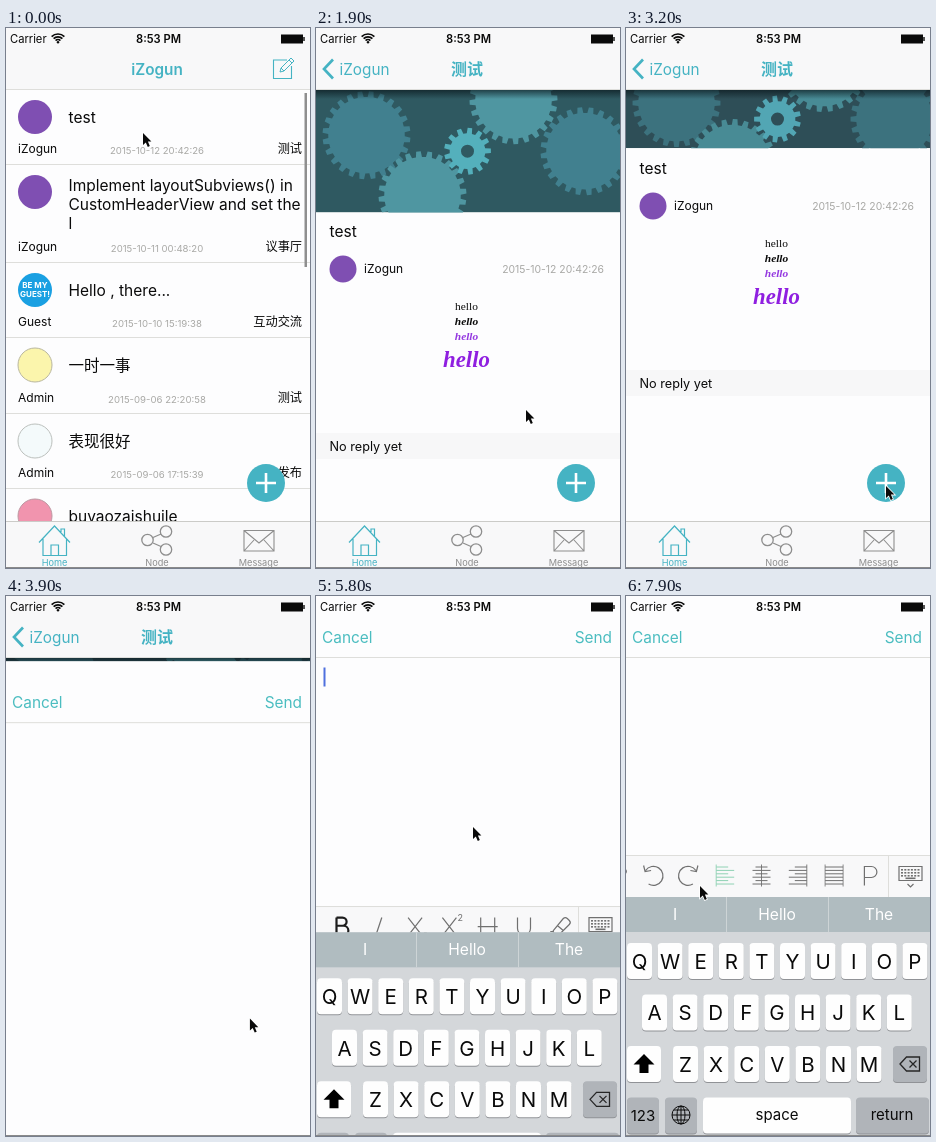
An HTML page with a canvas for the animation above (8 s loop, 304x540 px).

```html
<!DOCTYPE html>
<html lang="en">
<head>
<meta charset="utf-8">
<title>Forum app</title>
<style>
html, body { margin: 0; width: 100%; height: 100%; overflow: hidden; background: #fdfdfe; }
canvas { display: block; width: 304px; height: 540px; }
</style>
</head>
<body>
<canvas id="stage"></canvas>
<script>
const W = 304, H = 540, LOOP = 8000, STEP = 100, NAV = 62;
const canvas = document.getElementById('stage');
const ctx = canvas.getContext('2d');
const scale = window.devicePixelRatio || 1;
canvas.width = W * scale;
canvas.height = H * scale;

const SANS = 'Inter, "Noto Sans CJK SC", "Noto Sans CJK", sans-serif';
const SERIF = '"Liberation Serif", serif';
const PAPER = '#fdfdfe', BAR = '#f8f8f9', LINE = '#dededb', INK = '#0a0a0a';
const TEAL = '#45b3c3', GREEN = '#4bbdc0', DATE = '#a9a9a6', GREY = '#8e8e8e', ICON = '#707070';
const PURPLE = '#7f4fb2', OWNER = 'iZogun';

// ---- timing ----
const spring = ms => ms <= 0 ? 0 : 1 - (1 + .01826 * ms) * Math.exp(-.01826 * ms);
const mix = (a, b, p) => a + (b - a) * p;
const clamp = p => Math.max(0, Math.min(1, p));

// keys: [time, value, value...], eased between neighbours
function track(keys, t) {
  let i = 0;
  while (i < keys.length - 1 && keys[i + 1][0] <= t) i++;
  const a = keys[i], b = keys[i + 1] || a;
  const p = b === a ? 0 : clamp((t - a[0]) / (b[0] - a[0]));
  return a.slice(1).map((v, k) => mix(v, b[k + 1], p * p * (3 - 2 * p)));
}

const POINTER = [
  [0, 137, 105], [400, 137, 105], [1000, 190, 351], [1100, 191, 357], [1300, 197, 206],
  [1900, 210, 382], [2200, 211, 387], [2900, 258, 453], [3200, 260, 458], [3700, 260, 458],
  [4500, 157, 231], [6000, 157, 231], [6500, 232, 284], [7300, 74, 290]
];
const PULL = [[1300, 0], [1900, 120], [2200, 120], [2600, 57]];
const TOOL_SCROLL = [[6500, 0], [7400, 254]];

// ---- drawing helpers ----
function text(str, x, y, size, color, { align = 'left', weight = 400, family = SANS, style = '' } = {}) {
  ctx.font = `${style} ${weight} ${size}px ${family}`;
  ctx.textAlign = align;
  ctx.fillStyle = color;
  ctx.fillText(str, x, y + size * .36);
}
function rect(x, y, w, h, color) {
  ctx.fillStyle = color;
  ctx.fillRect(x, y, w, h);
}
function disc(x, y, r, color, edge) {
  ctx.beginPath();
  ctx.arc(x, y, r, 0, 7);
  ctx.fillStyle = color;
  ctx.fill();
  if (edge) { ctx.strokeStyle = edge; ctx.lineWidth = 1; ctx.stroke(); }
}
function stroke(d, color, width = 1.2) {
  ctx.strokeStyle = color;
  ctx.lineWidth = width;
  ctx.stroke(new Path2D(d));
}
function fill(d, color) {
  ctx.fillStyle = color;
  ctx.fill(new Path2D(d));
}
function group(x, y, draw, alpha = 1) {
  ctx.save();
  ctx.translate(x, y);
  ctx.globalAlpha *= alpha;
  draw();
  ctx.restore();
}
function clip(x, y, w, h) {
  ctx.beginPath();
  ctx.rect(x, y, w, h);
  ctx.clip();
}

// ---- topic list ----
const ROWS = [
  { h: 75, title: ['test'], who: OWNER, date: '2015-10-12 20:42:26', node: '测试', color: PURPLE },
  { h: 98, title: ['Implement layoutSubviews() in', 'CustomHeaderView and set the', 'l'], who: OWNER,
    date: '2015-10-11 00:48:20', node: '议事厅', color: PURPLE },
  { h: 75, title: ['Hello , there...'], who: 'Guest', date: '2015-10-10 15:19:38', node: '互动交流', color: '#1aa0e2' },
  { h: 76, title: ['一时一事'], who: 'Admin', date: '2015-09-06 22:20:58', node: '测试', color: '#fbf5ac', edge: '#b9b7a0' },
  { h: 75, title: ['表现很好'], who: 'Admin', date: '2015-09-06 17:15:39', node: '发布', color: '#f4fafb', edge: '#bcc0bd' },
  { h: 75, title: ['buyaozaishuile'], who: 'Admin', date: '2015-09-06 16:02:11', node: '测试', color: '#f194ae', edge: '#bd98a2' }
];

function drawList(t) {
  rect(0, 0, W, H, PAPER);
  let top = NAV;
  for (const r of ROWS) {
    const bottom = top + r.h;
    disc(29, top + 27, 17, r.color, r.edge);
    if (r.who === 'Guest') {
      text('BE MY', 29, top + 22, 8, '#fff', { align: 'center', weight: 700 });
      text('GUEST!', 29, top + 31, 8, '#fff', { align: 'center', weight: 700 });
    }
    const first = r.title.length > 1 ? 20 : 27;
    r.title.forEach((s, i) => text(s, 62.5, top + first + i * 19, 15.5, INK));
    text(r.who, 12, bottom - 16, 12, INK);
    text(r.date, 151, bottom - 14, 9.6, DATE, { align: 'center' });
    text(r.node, 296, bottom - 16, 12.2, INK, { align: 'right' });
    rect(0, bottom - 1, W, 1, LINE);
    top = bottom;
  }
  ctx.globalAlpha = 1 - clamp((t - 300) / 300);
  rect(298.5, 65, 2.5, 174, '#8f8f8f');
  ctx.globalAlpha = 1;
}

// ---- topic page with gears behind it ----
function gear(x, y, r, teeth, angle, color, hole = 0) {
  const step = Math.PI * 2 / teeth, inner = r * (hole ? .76 : .87);
  ctx.beginPath();
  for (let i = 0; i < teeth; i++) {
    for (const [f, rad] of [[-.3, inner], [-.2, r], [.2, r], [.3, inner]]) {
      const a = angle + (i + f) * step;
      ctx.lineTo(x + Math.cos(a) * rad, y + Math.sin(a) * rad);
    }
  }
  ctx.closePath();
  if (hole) { ctx.moveTo(x + hole, y); ctx.arc(x, y, hole, 0, Math.PI * 2, true); }
  ctx.fillStyle = color;
  ctx.fill('evenodd');
}
const blend = (a, b, p) => `rgb(${a.map((v, i) => Math.round(mix(v, b[i], p)))})`;

function drawGears(t, pull) {
  const height = pull * 1.02, p = clamp((t - 2300) / 500);
  const turn = pull * .02 + Math.max(0, t - 2200) * .002;
  const outer = blend([65, 128, 143], [60, 114, 126], p);
  const middle = blend([79, 150, 161], [72, 139, 149], p);
  ctx.save();
  clip(0, NAV, W, height);
  rect(0, NAV, W, height, blend([47, 89, 97], [46, 78, 87], p));
  ctx.translate(151.5, NAV + height / 2);
  gear(-101, -16, 44, 24, -turn / 2, outer);
  gear(46, -51, 44, 24, -turn / 2 + .1, middle);
  gear(117, 0, 44, 24, turn / 2, outer);
  gear(-45, 44, 44, 24, -turn / 2 + .06, middle);
  gear(0, 0, 23.5, 13, turn, blend([84, 176, 188], [82, 166, 180], p), 6.5);
  ctx.restore();
  const shade = ctx.createLinearGradient(0, NAV, 0, NAV + 9);
  shade.addColorStop(0, 'rgba(8,20,25,.65)');
  shade.addColorStop(1, 'rgba(8,20,25,0)');
  rect(0, NAV, W, Math.min(9, height), shade);
}

function drawTopic(t) {
  const [pull] = track(PULL, t);
  rect(0, 0, W, H, PAPER);
  if (pull > 0) drawGears(t, pull);
  group(0, pull, () => {
    text('test', 13.5, 83, 15.5, INK);
    disc(27, 121, 13.5, PURPLE);
    text(OWNER, 48, 121, 12, INK);
    text('2015-10-12 20:42:26', 288, 121.5, 10.4, DATE, { align: 'right' });
    const hello = (y, size, color, weight, style) =>
      text('hello', 150.5, y, size, color, { align: 'center', weight, style, family: SERIF });
    hello(158, 11.4, INK, 400, '');
    hello(173, 11.4, INK, 700, 'italic');
    hello(187.5, 11.4, '#9438e0', 700, 'italic');
    hello(210.5, 22.8, '#8f1fe0', 700, 'italic');
    rect(0, 285, W, 26, '#f7f7f8');
    text('No reply yet', 13.5, 298, 12.7, INK);
  });
}

// ---- bars ----
function drawStatus() {
  text('Carrier', 4, 11, 11.2, INK);
  for (const r of [3.4, 6.2, 9]) {
    ctx.beginPath();
    ctx.arc(52, 15, r, -Math.PI * .75, -Math.PI * .25);
    ctx.strokeStyle = INK;
    ctx.lineWidth = 1.7;
    ctx.stroke();
  }
  disc(52, 14.2, 1.2, INK);
  text('8:53 PM', 152.5, 11, 11.2, INK, { align: 'center', weight: 600 });
  rect(275, 6.5, 22, 9, INK);
  rect(297.3, 9, 1.4, 4, INK);
}

function drawNav(p) {
  rect(0, 0, W, NAV, BAR);
  rect(0, NAV - 1, W, 1, LINE);
  text(OWNER, mix(151, 48.5, p), 41, 15.3, TEAL, { align: 'center', weight: p < .5 ? 600 : 400 });
  group(mix(80, 0, p), 0, () => {
    text('测试', 151, 41, 16, TEAL, { align: 'center', weight: 600 });
  }, p);
  group(0, 0, () => stroke('M17 31.5L8 41l9 9.5', TEAL, 2.7), p);
  group(0, 0, () => {
    stroke('M281 32H267.500V50.500H285.500V38', TEAL, 1.1);
    stroke('M274 44l1-4 10-10 3 3-10 10zM275 40l3 3M283 32l3 3', TEAL, 1);
  }, 1 - p);
}

function drawTabs() {
  rect(0, 493, W, 47, BAR);
  rect(0, 493, W, 1, '#cbcbc8');
  stroke('M33 514.500L48.500 498 64 514.500M37 511V527.500H60.500V511M45 527.500V517H52.500V527.500M55 504V501H58.500V508', TEAL, 1.2);
  stroke('M147 509.500L155 506M147 515L155 518.500', GREY, 1.3);
  for (const [x, y] of [[141.500, 512], [160, 503.500], [160, 521.500]]) {
    ctx.beginPath();
    ctx.arc(x, y, 5.7, 0, 7);
    ctx.stroke();
  }
  stroke('M238 502.500h30v20.500h-30zM238 502.500L253 515l15-12.500M238 523l10-11M268 523l-10-11', GREY, 1.1);
  text('Home', 48.5, 534.5, 9.2, TEAL, { align: 'center' });
  text('Node', 151, 534.5, 9.2, GREY, { align: 'center' });
  text('Message', 252.5, 534.5, 9.2, GREY, { align: 'center' });
}

function drawAddButton() {
  disc(260, 455, 19, TEAL);
  stroke('M250 455h20M260 445v20', '#fff', 2.6);
}

// ---- editor ----
// side: -1 left, 0 centre, 1 right
const alignIcon = side => color => {
  for (let i = 0; i < 6; i++) {
    const width = i % 2 ? 18 : 12;
    stroke(`M${side * (18 - width) / 2 - width / 2} ${i * 3.4 - 8.5}h${width}`, color, 1);
  }
  stroke(`M${side * 9} -11v22`, color, .9);
};
const turnIcon = dir => color => {
  ctx.scale(dir, 1);
  stroke('M-7 -5A9.500 9.500 0 1 1 -4 8.500M-9 -10l1.500 6 6-1', color, 1.2);
};
const TOOLS = [
  () => stroke('M-6 -9V9H1A4.800 4.800 0 0 0 1 -.8H-6M-6 -9H0A4.100 4.100 0 0 1 0 -.8', '#1c1c1c', 2.2),
  c => stroke('M3 -9L-3 9', c),
  c => { stroke('M-7 -9L7 9M7 -9L-7 9', c); text('2', 8, 9, 8, c); },
  c => { stroke('M-9 -9L5 9M5 -9L-9 9', c); text('2', 6, -9, 9, c); },
  c => stroke('M-7 -9V9M7 -9V9M-10 0H10', c),
  c => stroke('M-6.500 -9V2A6.500 6.500 0 0 0 6.500 2V-9M-8 11H8', c),
  c => { stroke('M-7 4L3 -8q2-2 4 0l2 2q2 2 0 4L-1 8q-2 2-4 0l-2-2zM-3 -1l6 5', c); stroke('M-11 9h5M-10 5h3', c, 1); },
  turnIcon(1),
  turnIcon(-1),
  () => alignIcon(-1)('#8fd2b4'),
  alignIcon(0),
  alignIcon(1),
  c => { for (let i = 0; i < 6; i++) stroke(`M-9 ${i * 3.4 - 8.5}H9`, c, 1); stroke('M-9 -11V11M9 -11V11', c, .8); },
  c => stroke('M-6 10V-9H1A5.500 5.500 0 0 1 1 2H-6', c)
];

function drawToolbar(y, scroll) {
  rect(0, y, W, 43, BAR);
  rect(0, y, W, 1, LINE);
  ctx.save();
  clip(0, y, 262, 43);
  TOOLS.forEach((icon, i) => group(26.5 + i * 36.3 - scroll, y + 20.5, () => icon(ICON)));
  ctx.restore();
  rect(262, y, 1, 43, LINE);
  group(284.5, y + 20, () => {
    stroke('M-11.500 -8.500h23v14h-23zM-3 9l3 3 3-3', ICON, 1.2);
    for (let r = 0; r < 3; r++)
      for (let k = 0; k < 6; k++) rect(-9.5 + k * 3.3, -6 + r * 3, 2, 1.6, ICON);
    rect(-5, 2.5, 10, 1.6, ICON);
  });
}

function key(x, y, w, color = '#fefefe') {
  ctx.beginPath();
  ctx.roundRect(x, y + 1, w, 36, 4);
  ctx.fillStyle = '#909296';
  ctx.fill();
  ctx.beginPath();
  ctx.roundRect(x, y, w, 36, 4);
  ctx.fillStyle = color;
  ctx.fill();
}

function drawKeyboard(dy) {
  const dark = '#b0b4b9', mid = { align: 'center' };
  group(0, dy, () => {
    rect(0, 301, W, 239, '#d4d7da');
    rect(0, 301, W, 35, '#b0bcc0');
    rect(100, 301, 1, 35, '#cdd4d6');
    rect(202, 301, 1, 35, '#cdd4d6');
    ['I', 'Hello', 'The'].forEach((s, i) => text(s, 49 + i * 102, 318, 15.6, '#fff', mid));
    [['QWERTYUIOP', 13.5, 347], ['ASDFGHJKL', 28.5, 398.5], ['ZXCVBNM', 59.5, 450]].forEach(([row, x0, y]) => {
      [...row].forEach((c, i) => {
        const x = x0 + i * 30.6;
        key(x - 12.5, y, 25);
        text(c, x, y + 18.5, 20.5, INK, mid);
      });
    });
    key(1, 450, 34);
    fill('M18 458l10.500 10.500h-6v8.500h-9v-8.500h-6z', '#000');
    key(267, 450, 34, dark);
    stroke('M274 468l6.500-7h13v14h-13zM283.500 464.500l7 7M290.500 464.500l-7 7', '#262626', 1.3);
    key(1, 501.5, 32, dark);
    text('123', 17, 520, 15, INK, mid);
    key(39, 501.5, 32, dark);
    stroke('M46 519a9 9 0 1 0 18 0a9 9 0 1 0-18 0zM51 519a4 9 0 1 0 8 0a4 9 0 1 0-8 0zM46 519h18M55 510v18M48 514h14M48 524h14', INK, 1);
    key(77, 501.5, 148);
    text('space', 151, 519, 15, INK, mid);
    key(230, 501.5, 73, dark);
    text('return', 266, 519, 15, INK, mid);
  });
}

function drawEditor(t) {
  rect(0, 0, W, H, PAPER);
  rect(0, NAV - 1, W, 1, LINE);
  text('Cancel', 6, 41, 15.4, GREEN);
  text('Send', 296, 41, 15.4, GREEN, { align: 'right' });
  const blinkOff = t >= 6700 && (t - 6700) % 1000 < 400;
  if (t >= 5600 && !blinkOff) rect(7.5, 71.5, 2, 19, '#4f70de');
  if (t > 5600) {
    drawToolbar(mix(540, 259, spring(t - 5629)), track(TOOL_SCROLL, t)[0]);
    drawKeyboard(240 * (1 - spring(t - 5614)));
  }
}

function drawPointer(t) {
  const [x, y] = track(POINTER, t);
  group(x, y, () => {
    const arrow = 'M0 0V12L2.800 9.400 4.800 14 6.800 13.100 4.900 8.600H8.400z';
    stroke(arrow, '#fff', 1.6);
    fill(arrow, '#0a0a0a');
  });
}

function draw(t) {
  ctx.setTransform(scale, 0, 0, scale, 0, 0);
  const push = spring(t - 350), modal = spring(t - 3700);
  if (modal < .999) {
    if (push < .999) group(-91 * push, 0, () => drawList(t));
    if (push > 0) group(W * (1 - push), 0, () => drawTopic(t));
    drawNav(push > .999 ? 1 : push);
    drawTabs();
    drawAddButton();
  }
  if (modal > 0) group(0, modal > .999 ? 0 : H * (1 - modal), () => drawEditor(t));
  drawStatus();
  rect(0, 539, W, 1, '#8a8a8a');
  drawPointer(t);
}

const start = performance.now();
function tick() {
  const t = Math.max(0, performance.now() - start) % LOOP;
  draw(Math.floor(t / STEP) * STEP);
  requestAnimationFrame(tick);
}
tick();
</script>
</body>
</html>
```
